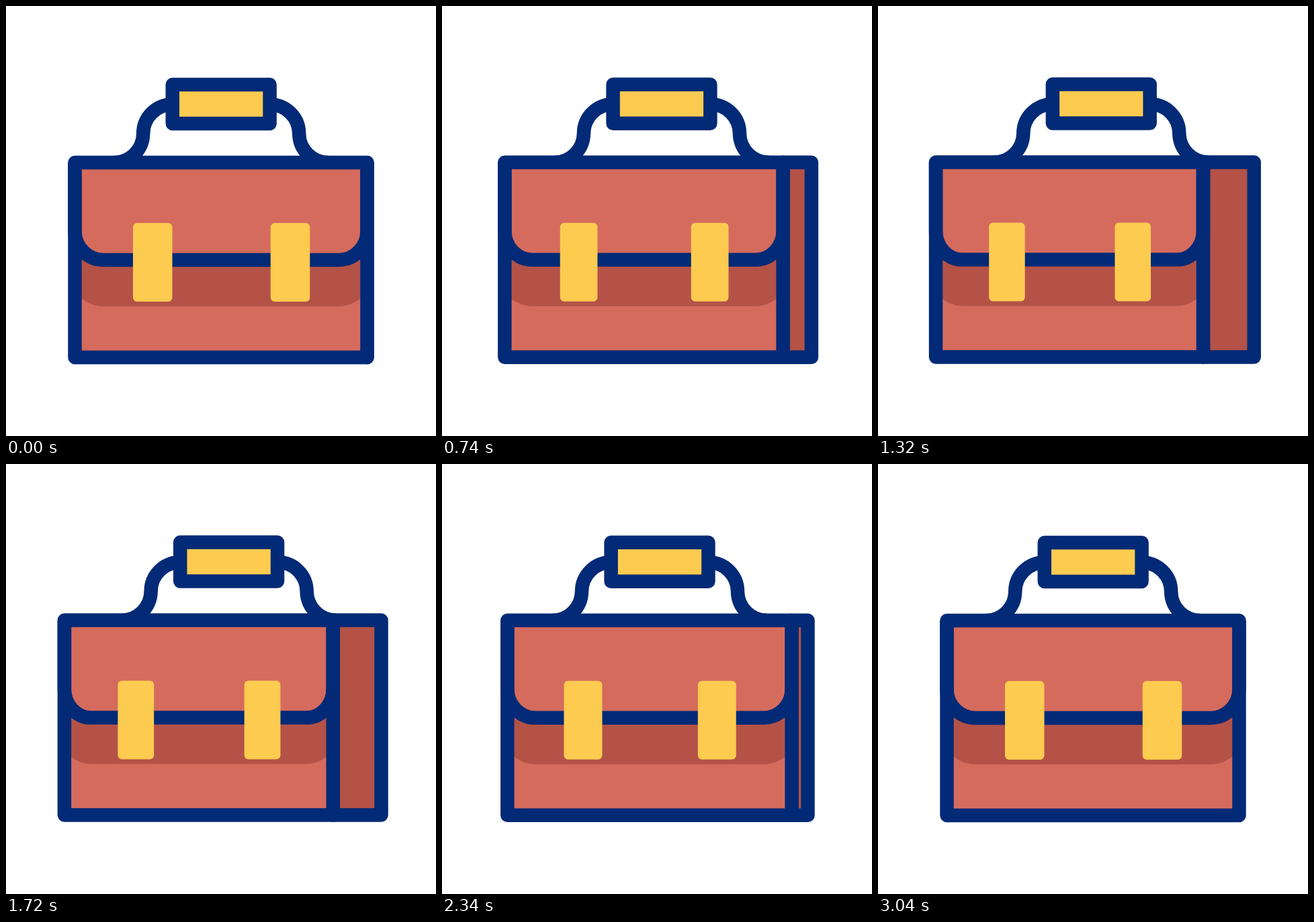
Animation of 640x640 px, one loop 3.6 s. Source, as an HTML page:

```html
<!DOCTYPE html>
<html lang="en">
<head>
<meta charset="utf-8">
<title>Briefcase</title>
<style>
  html, body { margin: 0; width: 100%; height: 100%; overflow: hidden; background: #fff; }
  svg { display: block; width: 100vw; height: 100vh; }
  .line { fill: none; stroke: #032a76; stroke-width: 20.5; stroke-linejoin: round; }
  .light { fill: #d56b5d; }
  .dark { fill: #b45247; }
  .gold { fill: #fdcb50; }
</style>
</head>
<body>
<svg viewBox="0 0 640 640">
  <g id="bag">
    <g id="handle">
      <path class="line" d="M248 146.5A43.5 43.5 0 0 0 204.2 190A43.5 43.5 0 0 1 160.7 233"/>
      <path class="line" d="M392.4 146.5A43.5 43.5 0 0 1 436.2 190A43.5 43.5 0 0 0 479.7 233"/>
      <rect class="line" style="fill:#fdcb50" x="247.8" y="117" width="144.8" height="58"/>
    </g>
    <rect id="side" class="line" style="fill:#b45247" y="233" height="290"/>
    <rect id="front" class="light" y="233" height="290"/>
    <path id="shade" class="dark"/>
    <path id="flap" class="light"/>
    <path id="flapLine" class="line"/>
    <rect id="frame" class="line" y="233" height="290"/>
    <rect id="clasp1" class="gold" y="323" height="117" rx="6"/>
    <rect id="clasp2" class="gold" y="323" height="117" rx="6"/>
  </g>
</svg>
<script>
const LOOP = 3600, PEAK = 1440, END = 3040;
const LEFT = 102.5, RIGHT = 537.5, WIDTH = RIGHT - LEFT;
const el = id => document.getElementById(id);

function setAttrs(id, attrs) {
  for (const key in attrs) el(id).setAttribute(key, attrs[key]);
}

function bezier(x1, x2) {
  return u => {
    let lo = 0, hi = 1, s = 0.5;
    for (let i = 0; i < 24; i++) {
      s = (lo + hi) / 2;
      const x = 3 * s * (1 - s) * ((1 - s) * x1 + s * x2) + s ** 3;
      if (x < u) lo = s; else hi = s;
    }
    return s * s * (3 - 2 * s);
  };
}
const rise = bezier(0.5, 0.47), fall = bezier(0.45, 0.45);

function turnAt(t) {
  if (t < PEAK) return rise(t / PEAK);
  if (t < END) return 1 - fall((t - PEAK) / (END - PEAK));
  return 0;
}

function draw(t) {
  const turn = turnAt(t);
  const left = LEFT - 16.6 * turn;
  const fold = RIGHT - 54 * turn;
  const right = RIGHT + 22.4 * turn;
  const width = fold - left, scale = width / WIDTH;
  const corner = 43 * scale;

  // A U shape with rounded lower corners, used for the flap and its shadow.
  const pocket = (top, shoulder, base, rx, ry) =>
    `M${left} ${top}V${shoulder}A${rx} ${ry} 0 0 0 ${left + corner} ${base}` +
    `H${fold - corner}A${rx} ${ry} 0 0 0 ${fold} ${shoulder}V${top}`;

  const flap = pocket(233, 335, 378, corner, 43);
  setAttrs("bag", { transform: `translate(0 ${-0.45 * turn})` });
  setAttrs("handle", { transform: `translate(${12.2 * turn} 0)` });
  setAttrs("side", { x: fold, width: right - fold });
  setAttrs("front", { x: left, width });
  setAttrs("frame", { x: left, width });
  setAttrs("shade", { d: pocket(340, 425, 447, 53 * scale, 53) });
  setAttrs("flap", { d: flap });
  setAttrs("flapLine", { d: flap });
  setAttrs("clasp1", { x: left + 86.5 * scale, width: 58.5 * scale });
  setAttrs("clasp2", { x: left + 291.3 * scale, width: 58.5 * scale });
}

const start = performance.now();
function tick() {
  draw((performance.now() - start) % LOOP);
  requestAnimationFrame(tick);
}
tick();
</script>
</body>
</html>
```
